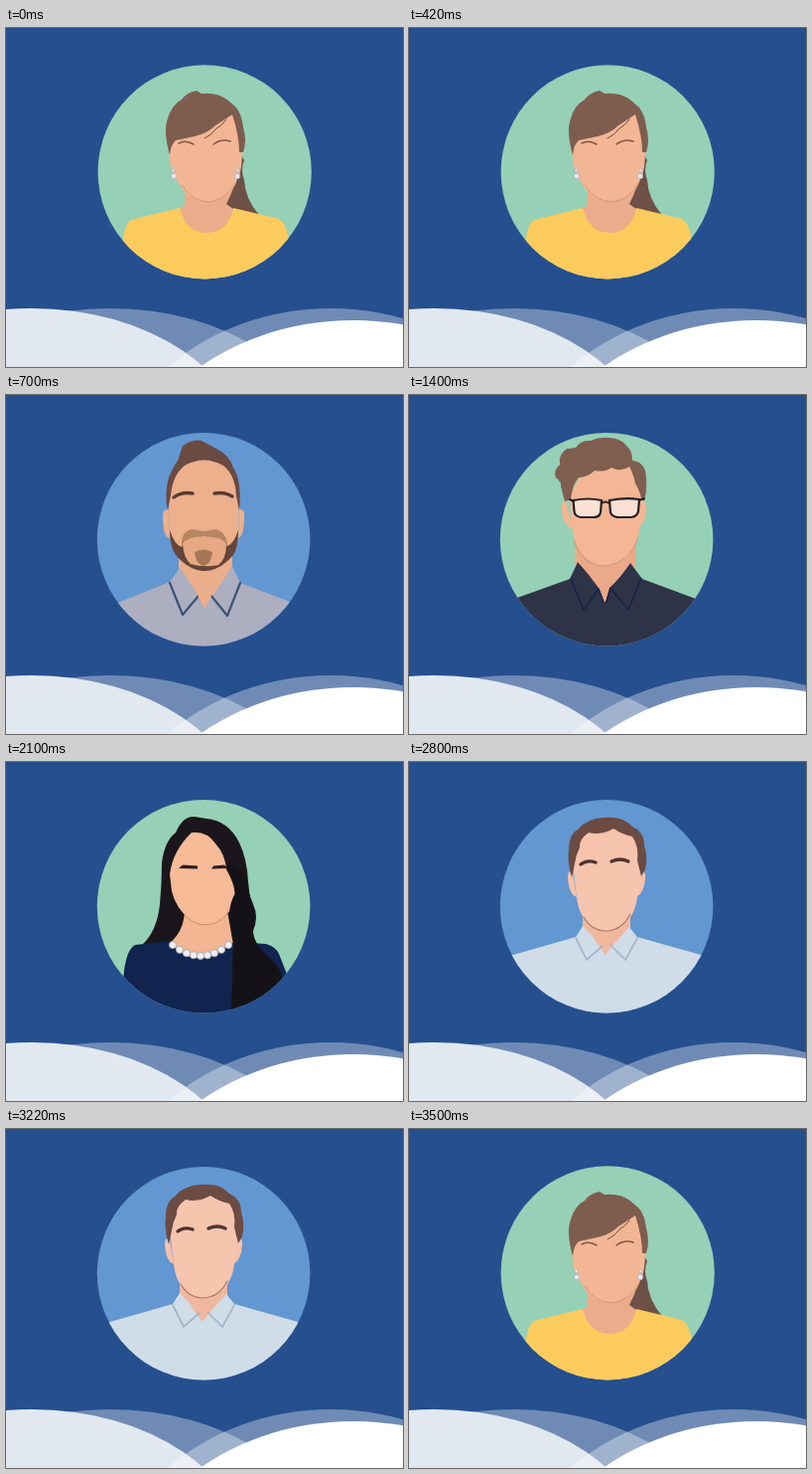
An HTML page for the animation above (4200 ms loop, 400 by 341 pixels).

```html
<!DOCTYPE html>
<html lang="en">
<head>
<meta charset="utf-8">
<title>Portraits</title>
<style>
  html, body { margin: 0; width: 100%; height: 100%; overflow: hidden; background: #254f8e; }
  svg { display: block; width: 100vw; height: 100vh; }
  .portrait { visibility: hidden; }
  .line { fill: none; stroke-linecap: round; stroke-linejoin: round; }
</style>
</head>
<body>
<svg viewBox="0 0 400 341" preserveAspectRatio="none">
  <defs>
    <clipPath id="disc"><circle cx="199.1" cy="145.2" r="107.3"/></clipPath>
    <clipPath id="discWide"><circle cx="200.2" cy="144.8" r="107.6"/></clipPath>
  </defs>
  <rect width="400" height="341" fill="#254f8e"/>

  <!-- woman with ponytail -->
  <g class="portrait" clip-path="url(#discWide)">
    <rect x="90" y="35" width="220" height="220" fill="#96d0b6"/>
    <path d="M180 148V178L172 184Q184 209 203 209Q222 209 232 184L228 179V146Z" fill="#ebac8b"/>
    <path d="M236 126L240 133Q236 143 240 153Q241 172 255 188L229 182L222 177Q231 160 232 146Z" fill="#6d5046"/>
    <path d="M166 116Q163 124 166 139Q168 151 173 154Q182 175 206 175Q228 171 233 152Q238 145 238 122L230 82L200 90Z" fill="#f3b694"/>
    <path class="line" d="M177 158Q187 175 206 175Q224 171 231 156" stroke="#cf9678"/>
    <path d="M165 128Q158 103 163 91Q167 77 177 72Q182 65 192 63L197 66Q213 64 224 73L232 80Q238 88 239 100Q243 113 239 125L235 125Q235 109 228 87Q219 93 211 98Q203 106 190 109L171 113Q166 117 165 128Z" fill="#7e5d4f"/>
    <path class="line" d="M200 111Q207 108 212 101Q218 98 222 92" stroke="#6b4b3f"/>
    <path class="line" d="M174 116Q181 112 189 117M209 117Q217 111 226 114" stroke="#7d5847" stroke-width="1.5"/>
    <path d="M115 260L118 211Q120 197 126 193L175 181Q181 206 203 206Q224 205 229 181L275 192Q282 196 285 212L290 260Z" fill="#fccb5e"/>
    <g fill="#e7e8ee" stroke="#a9a4b5" stroke-width=".7">
      <circle cx="168.5" cy="143" r="1.7"/><circle cx="169" cy="149" r="2.8"/>
      <circle cx="233.5" cy="143" r="1.7"/><circle cx="233" cy="149" r="2.8"/>
    </g>
  </g>

  <!-- bearded man -->
  <g class="portrait" clip-path="url(#disc)">
    <rect x="90" y="35" width="220" height="220" fill="#6397d1"/>
    <path d="M174 152V180L200 216L228 178V150Z" fill="#ebaf8b"/>
    <path d="M164 115Q158 114 158 122Q158 143 165 144ZM235 115Q241 114 240 122Q240 142 234 144Z" fill="#ecb08c"/>
    <path d="M164 108C164 80 172 62 199 62C227 62 235 80 235 108L234 140Q231 172 200 174Q169 171 165 142Z" fill="#ecb08c"/>
    <path d="M165 136Q170 151 177 153Q178 141 185 138H214Q222 141 223 152Q230 149 234 136Q234 154 229 161Q215 177 200 177Q185 177 171 161Q165 153 165 136Z" fill="#654539"/>
    <path d="M177 153Q176 137 187 135L199 137L212 135Q223 139 223 153Q217 141 199 142Q182 142 177 153Z" fill="#b78562"/>
    <path d="M178 150Q183 142 199 142Q217 142 222 150Q222 165 214 171Q200 174 186 170Q179 164 178 150Z" fill="#e6a983"/>
    <path d="M190 158Q199 153 208 158Q207 170 199 172Q191 170 190 158Z" fill="#a77657"/>
    <path d="M163 116Q159 99 164 83Q169 71 173 66L178 51Q189 44 197 46L212 54Q225 60 229 73Q238 87 235 116L232 102Q231 80 219 71Q199 60 180 71Q168 80 166 101Z" fill="#6b4a42"/>
    <path class="line" d="M169 103Q177 97 188 99M210 99Q220 97 228 102" stroke="#5c3c33" stroke-width="3.4"/>
    <path d="M90 260V220L113 209L165 188L175 174Q186 187 200 214Q211 198 228 172L236 189L286 208L310 260Z" fill="#adaec0"/>
    <path class="line" d="M165 189L178 221L194 202M236 189L223 222L206 201" stroke="#3d536f" stroke-width="2.2"/>
    <path d="M184 183L200 215L217 183Z" fill="#ebaf8b"/>
  </g>

  <!-- man with glasses -->
  <g class="portrait" clip-path="url(#disc)">
    <rect x="90" y="35" width="220" height="220" fill="#96d0b6"/>
    <path d="M167 138V172L196 209L228 172V138Z" fill="#eaaa89"/>
    <path d="M158 106Q153 106 154 117Q156 133 165 134ZM234 106Q240 106 239 117Q237 132 230 134Z" fill="#f4b694"/>
    <path d="M162 100L177 74L224 66L236 100L233 130Q230 160 211 169Q197 175 184 168Q167 157 164 132Z" fill="#f4b694"/>
    <path class="line" d="M166 146Q174 172 197 172Q223 169 231 143" stroke="#cf9678"/>
    <path d="M157 107L153 92Q154 88 148 83Q145 76 152 70Q150 60 159 54Q163 54 168 53Q173 45 183 46Q192 42 201 43Q213 43 219 51Q225 55 225 66Q234 66 238 76Q241 92 237 107L234 104Q232 95 228 89Q226 79 222 72Q214 78 204 73Q198 78 187 76Q180 83 171 83Q165 89 163 105Z" fill="#7f5e50"/>
    <g fill="#fbe1d3" stroke="#251f24" stroke-width="2.2">
      <path d="M165.500 106Q180 103 194 106L193 118Q192 123 186 123H173Q167 122 166.500 117ZM202 106Q217 103 232 105L231 117Q230 122 224 123H210Q204 122 203 118Z"/>
    </g>
    <path class="line" d="M162 105L166 107M194 109Q198 106 202 109M232 106L237 104" stroke="#251f24" stroke-width="2"/>
    <path d="M90 260V211L109 204L162 185L170 168Q181 180 191 194L196 208L198 208L202 194Q213 184 223 169L235 185L289 205L310 260Z" fill="#2f3347"/>
    <path class="line" d="M163 185L176 216L191 195L196 208M234 185L221 216L203 194L199 208" stroke="#142448" stroke-width="1.5"/>
  </g>

  <!-- woman with pearls -->
  <g class="portrait" clip-path="url(#disc)">
    <rect x="90" y="35" width="220" height="220" fill="#96d0b6"/>
    <path d="M138 183Q152 170 155 143Q157 122 157 101Q160 79 171 71Q178 54 190 55L202 57Q224 59 235 81Q243 98 244 120L246 138L240 190L162 183Z" fill="#1b161c"/>
    <path d="M180 147Q180 170 165 182Q184 205 209 196L229 184L222 144Z" fill="#f3b592"/>
    <path d="M165 113Q168 89 187 71Q202 69 211 82Q221 93 222 108Q233 128 230 138Q225 158 207 164Q196 167 185 158Q171 147 167 130Z" fill="#f7bb98"/>
    <path class="line" d="M181 155Q194 168 211 162Q223 156 228 144" stroke="#cb8e70"/>
    <path d="M174 107L178 103.500L193 104.500V107.500ZM207 107.500L209 104.500L220 103.500L223 107Z" fill="#2b2023"/>
    <path d="M114 260L119 210Q122 188 130 184L165 180Q180 202 205 196L230 181L262 183Q272 186 275 193L284 216L286 260Z" fill="#11234f"/>
    <path d="M222 102Q230 118 231 132Q223 146 226 160L230 176L228 200Q229 222 226 254H252Q278 232 279 219Q277 208 268 199Q249 183 249 170Q255 156 249 143Q244 132 241 112Z" fill="#151217"/>
    <g id="pearls" fill="#efeef0" stroke="#a9a8b2" stroke-width=".9"></g>
  </g>

  <!-- man in pale shirt -->
  <g class="portrait" clip-path="url(#disc)">
    <rect x="90" y="35" width="220" height="220" fill="#6397d1"/>
    <path d="M175 143V174L198 195L223 174V143Z" fill="#f0b79f"/>
    <path d="M165 111Q160 108 160 116Q161 133 169 136ZM233 111Q239 109 238 117Q237 132 229 136Z" fill="#f6c2ab"/>
    <path d="M165 103L169 76L184 66H212L230 76L234 104L230 136Q227 159 211 167Q199 173 186 166Q171 157 169 136Z" fill="#f7c4ae"/>
    <path class="line" d="M176 156Q184 170 199 170Q215 169 223 153" stroke="#a87968" stroke-width="1.2"/>
    <path d="M164 116Q159 101 161 87Q161 73 171 67Q179 57 196 56Q216 54 225 65Q237 70 237 84Q241 96 238 108L234 115L230 99Q232 85 225 75Q215 73 206 67Q194 74 181 71Q171 78 172 86Q168 94 167 102Z" fill="#6c4b42"/>
    <path class="line" d="M173 103Q179 98 188 101M204 100Q213 96 221 100" stroke="#51352f" stroke-width="3.4"/>
    <path d="M90 260V200L105 194L168 176L175 165Q186 175 198 193Q210 179 222 166L230 176L294 194L310 260Z" fill="#d0dce7"/>
    <path d="M186 178L198 194L204 183Q196 186 186 178Z" fill="#f0b79f"/>
    <path class="line" d="M168 177L179 199L195 185M230 177L218 199L203 184" stroke="#a4b7c9" stroke-width="1.7"/>
  </g>

  <!-- clouds -->
  <g fill="#fff">
    <ellipse cx="105" cy="427" rx="215" ry="145" opacity=".34"/>
    <ellipse cx="26" cy="427" rx="215" ry="145" fill="#e1e8f0"/>
    <ellipse cx="327" cy="489" rx="235" ry="207" opacity=".34"/>
    <ellipse cx="350" cy="494" rx="240" ry="200"/>
  </g>
</svg>
<script>
  const HOLD = 700;
  const ORDER = [0, 1, 2, 3, 4, 0];
  const portraits = document.querySelectorAll('.portrait');

  // Pearls hang along a shallow parabola.
  const pearls = document.getElementById('pearls');
  for (let i = 0; i < 9; i++) {
    const u = i / 4 - 1;
    const pearl = document.createElementNS('http://www.w3.org/2000/svg', 'circle');
    pearl.setAttribute('cx', 196 + 28 * u);
    pearl.setAttribute('cy', 195 - 11 * u * u);
    pearl.setAttribute('r', 3.6);
    pearls.append(pearl);
  }

  const start = performance.now();
  function draw(now) {
    const step = Math.floor(Math.max(0, now - start) / HOLD) % ORDER.length;
    portraits.forEach((p, i) => {
      p.style.visibility = i === ORDER[step] ? 'visible' : 'hidden';
    });
    requestAnimationFrame(draw);
  }
  draw(start);
</script>
</body>
</html>
```
